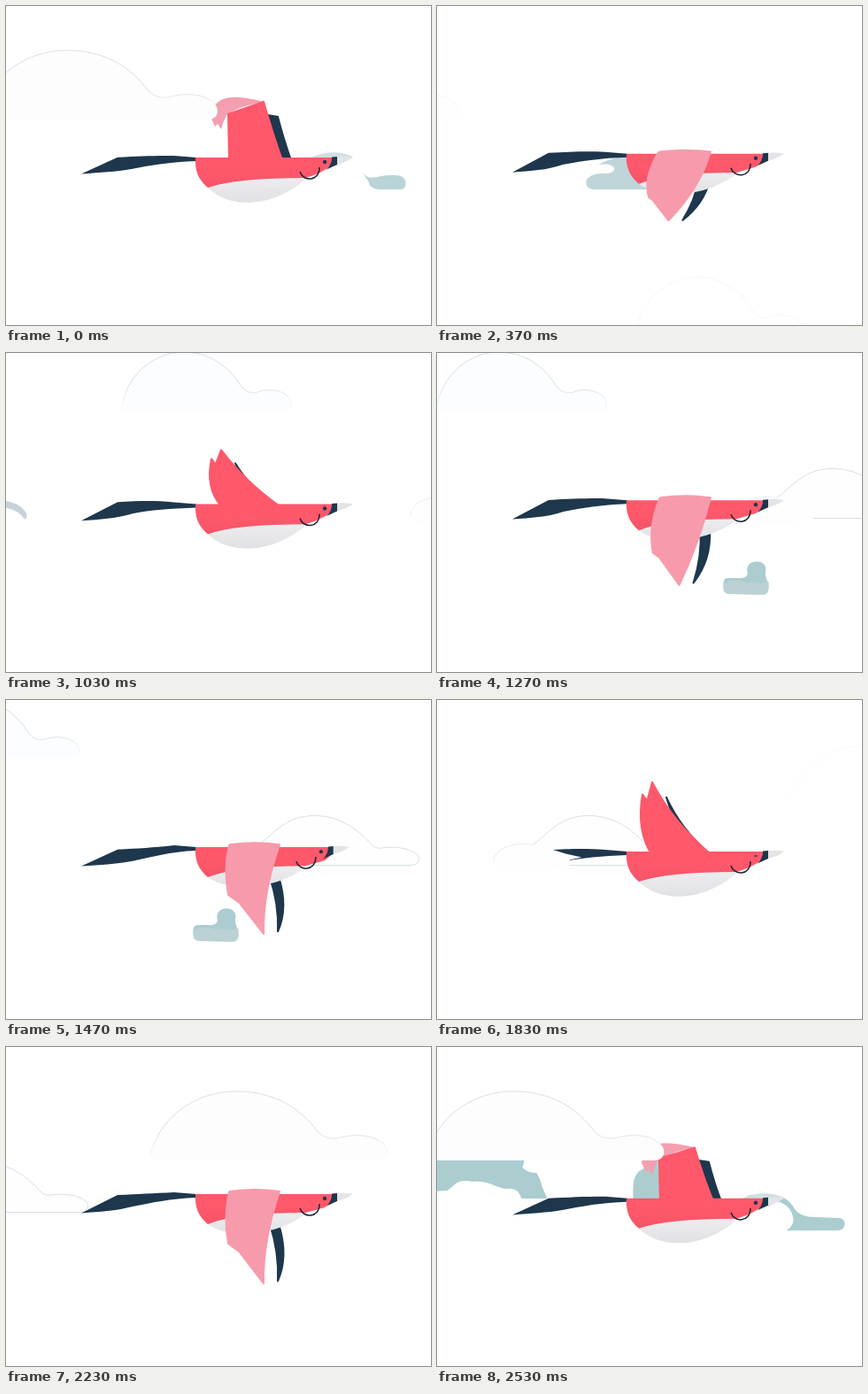
An HTML page with a canvas that plays this animation: 480x360 px, repeating every 2560 ms.

```html
<!DOCTYPE html>
<html>
<head>
<meta charset="utf-8">
<style>
  html, body { margin: 0; width: 100%; height: 100%; overflow: hidden; background: #fff; }
  canvas { display: block; }
</style>
</head>
<body>
<canvas id="stage" width="480" height="360"></canvas>
<script>
const ctx = document.getElementById('stage').getContext('2d');
const LOOP = 2560, FLAP = LOOP / 3;
const RED = '#ff586b', PINK = '#f79bac', NAVY = '#1e374c', TEAL = '#abcdd0';

const bigCloud = new Path2D('M5 78Q-3 75 2 64C15 25 54 0 97 0C140 0 170 20 188 45Q197 55 212 53C240 44 267 55 267 68Q267 78 255 78Z');
const lowCloud = new Path2D('M5 56Q-4 55 0 46C8 32 30 31 42 33C55 27 70 0 105 0C138 0 156 18 169 31Q174 39 186 36C208 34 224 42 224 48Q224 56 214 56Z');
const lowCloudFront = new Path2D('M5 62Q-4 55 0 46C8 32 30 31 42 33L64 38L80 43L98 47L84 50L92 54L60 62Z');
const crest = new Path2D('M-50 20Q-45 0 -26 0Q-6 2 0 15V20Z');
const boot = new Path2D('M4 18H18Q29 18 27 10C25 -4 49 -4 48 9Q46 15 51 24V30H0V24Q0 19 4 18Z');
const bootSole = new Path2D('M0 25Q10 18 22 22Q36 25 51 22V31Q50 37 44 37L6 36Q0 35 0 30Z');
const plume = new Path2D('M350 168Q392 160 404 182Q410 192 428 192L455 193Q462 194 461 201Q460 207 452 207H395Q406 200 402 190Q398 172 365 171Z');
const wisp = new Path2D('M403 188Q409 196 419 193Q452 186 452 200Q452 207 446 207H421Q411 206 410 198Z');
const puff = new Path2D('M215 169L248 178V207H176Q168 205 169 197Q174 188 190 189Q201 189 201 183Q198 177 183 179Q195 172 215 169Z');
const mistLeft = new Path2D('M-5 126H100L97 136Q103 142 113 142Q118 150 119 157L125 171H96Q92 158 80 160C68 160 60 150 40 152C22 148 20 158 12 162L-5 163Z');
const mistRight = new Path2D('M252 126V172H222V160Q222 139 238 136Z');
const beakHaze = new Path2D('M344 171Q369 160 392 170L375 180Z');
const foldedTip = new Path2D('M-60 17Q-59 4 -48 -2Q-35 -9 0 0Q-24 4 -41 14Q-45 20 -48 31L-52 25L-55 28Z');

const clamp = v => Math.max(0, Math.min(1, v));
const mix = (a, b, u) => a + (b - a) * u;
const within = (t, a, b) => t >= a && t < b;
const ease = (a, b, t) => {
  const u = clamp((t - a) / (b - a));
  return u * u * (3 - 2 * u);
};

function fill(path, color, x = 0, y = 0) {
  ctx.save();
  ctx.translate(x, y);
  ctx.fillStyle = color;
  ctx.fill(path);
  ctx.restore();
}

function cloud(shape, x, y, { sx = 1, sy = 1, alpha = 1, color = '#fdfdfd', line = '#c6d2d6', base = line } = {}) {
  const path = new Path2D();
  path.addPath(shape, new DOMMatrix([sx, 0, 0, sy, x, y]));
  ctx.globalAlpha = clamp(alpha);
  fill(path, color);
  ctx.strokeStyle = shade(y + 45 * sy, y + 77 * sy, line, base);
  ctx.lineWidth = .7;
  ctx.stroke(path);
  ctx.globalAlpha = 1;
}

function shade(y0, y1, from, to) {
  const g = ctx.createLinearGradient(0, y0, 0, y1);
  g.addColorStop(0, from);
  g.addColorStop(1, to);
  return g;
}

// Slow downstroke, quick folded recovery; down, reach and fold run 0..1
function strokeAt(p) {
  const down = p < .65 ? ease(.13, .53, p) : 1 - ease(.7, 1, p);
  const reach = p < .2 ? 1 - ease(0, .13, p) : ease(.3, .62, p);
  const fold = p < .5 ? 1 - ease(.01, .13, p) : ease(.87, .98, p);
  const tip = [243 + 48 * reach, mix(92, 267, down) + 16 * fold];
  return { p, down, reach, fold, tip };
}

// Control point beside the middle of an edge
const bend = (a, b, dx, dy = 0) => [(a[0] + b[0]) / 2 + 2 * dx, (a[1] + b[1]) / 2 + 2 * dy];

function drawNearWing({ p, down, reach, fold, tip }) {
  const rootY = 174 - 11 * down;
  const back = [mix(242, 252, Math.max(reach, down)), rootY], front = [309 + 3 * fold, rootY];
  const finger = [tip[0] - 11 - 29 * reach, tip[1] + mix(14, -25 - 20 * reach, down)];
  const notch = bend(finger, tip, -4 * down, 7 * (1 - fold) * (1 - 2 * down));
  const wing = new Path2D();
  wing.moveTo(...back);
  wing.quadraticCurveTo(...bend(back, finger, -6 * (1 - reach) - 3 * down, 3 * (1 - reach)), ...finger);
  wing.lineTo(...notch);
  wing.lineTo(...tip);
  wing.quadraticCurveTo(...bend(tip, front, -5 * (1 - fold) + 20 * down * (1 - reach), 2), ...front);
  wing.quadraticCurveTo(282, rootY - 4 * down, ...back);
  if (fold > .4) fill(foldedTip, '#f49fb0', ...tip);
  const color = within(p, .3, .88) ? PINK : RED;
  fill(wing, color);
  ctx.strokeStyle = color;
  ctx.lineWidth = 2;
  ctx.lineJoin = 'round';
  ctx.stroke(wing);
}

function drawFarWing({ down, fold, tip }) {
  const end = [tip[0] + 16, tip[1] + mix(17, -3, down)];
  const top = [end[0] - 12 * fold, end[1] - 2 * fold];
  const rootY = mix(174, 200, down);
  const back = [mix(280, 298, down), rootY], front = [308 + 14 * fold, rootY];
  const wing = new Path2D();
  wing.moveTo(...back);
  wing.quadraticCurveTo(...bend(back, top, 3 * down), ...top);
  wing.lineTo(...end);
  wing.quadraticCurveTo(...bend(end, front, mix(-4, 6, down) * (1 - fold), 2), ...front);
  fill(wing, NAVY);
  ctx.strokeStyle = NAVY;
  ctx.lineWidth = 2;
  ctx.lineJoin = 'round';
  ctx.stroke(wing);
}

function drawTail({ p, down }) {
  const elbow = 168.3 + 2.5 * Math.cos(2 * Math.PI * (p + .05));
  const root = 171 - 5 * down, tip = 189.5 - 2 * down;
  fill(new Path2D(`M85 ${tip}L126 ${elbow}C150 ${elbow - 1} 165 ${elbow - 2} 190 ${root - 2}L215 ${root}V${root + 4}
    C185 ${root + 5} 164 ${elbow + 9} 143 ${elbow + 13}C122 ${tip - 2} 108 ${tip - 2} 85 ${tip}Z`), NAVY);
}

function drawBody({ p, down }, blink) {
  const top = 171 - 5 * down, seam = 194 - 7 * down, left = 205 - 5 * down, chin = 185 - 4 * down;
  const belly = new Path2D(`M228 ${left}C${250 - 4 * down} ${228 - 14 * down} 300 ${230 - 12 * down} 340 ${seam}L300 ${seam - 5}Z`);
  fill(belly, shade(seam, 224 - 10 * down, '#ededef', '#dfe0e3'));
  const red = new Path2D(`M214 ${top}H368Q369 ${top + 10} 360 ${chin}Q350 ${seam - 3} 338 ${seam}Q260 ${seam} 228 ${left}C217 ${left - 9} 213 ${left - 20} 214 ${top}Z`);
  fill(red, shade(top + 14, left + 6, RED, '#f25368'));

  ctx.save();
  ctx.translate(-5 * clamp(1 - Math.abs(p - .74) / .1), top - 171);
  fill(new Path2D('M368 170.5L374 170V179L362 184.5Q368 179 368 170.5Z'), NAVY);
  fill(new Path2D('M374 170Q384 169 392 171Q384 176.5 374 179Z'), '#e3e4e6');
  ctx.fillStyle = NAVY;
  ctx.beginPath();
  ctx.ellipse(360, 176, 2.2, blink ? .7 : 2.2, 0, 0, 7);
  ctx.fill();
  ctx.strokeStyle = '#1b2530';
  ctx.lineWidth = 1.5;
  ctx.stroke(new Path2D('M332 187C335 198 354 199 354 182'));
  ctx.restore();
}

function drawMist(t) {
  const early = t > LOOP / 2 ? t - LOOP : t;
  if (within(early, -90, -10)) fill(plume, TEAL, -.56 * (early + 30));
  if (within(early, -10, 180)) fill(wisp, '#b9d3d6', -.56 * early);
  if (within(early, 180, 700)) fill(puff, '#bfd5d8', -.56 * (early - 370));
  if (within(early, -70, 40)) fill(beakHaze, '#cfe0e2');
  if (t > 2440) {
    const x = -.57 * (t - 2530);
    fill(mistLeft, TEAL, x);
    fill(mistRight, TEAL, x);
  }
  if (within(t, 1250, 1650)) {
    const x = 212 - .56 * (t - 1470);
    fill(boot, TEAL, x, 236);
    fill(bootSole, '#bcd1d4', x, 236);
  }
}

function draw(t) {
  const stroke = strokeAt(t % FLAP / FLAP);
  ctx.fillStyle = '#fff';
  ctx.fillRect(0, 0, 480, 360);

  // Clouds behind the bird
  const softBase = '#c6d2d600';
  cloud(bigCloud, 131 - .545 * (t - 1030), -1, { sx: .719, sy: .86, color: '#fbfdfe', base: softBase });
  if (t < 900) cloud(bigCloud, 225 - .57 * (t - 370), 306, { sx: .705, sy: .86, alpha: t / 1500 });
  const lowX = 243 - .492 * (t - 1470);
  cloud(lowCloud, lowX, 130.5, { color: '#fefefe' });
  if (within(t, 650, 1100)) {
    const x = 24 - .72 * (t - 1030);
    fill(crest, '#c7d2d8', x, 167);
    fill(crest, '#fff', x - 2, 174);
  }
  drawMist(t);

  drawFarWing(stroke);
  drawTail(stroke);
  fill(lowCloudFront, '#fefefe', lowX, 130.5);
  drawBody(stroke, within(t, 1790, 1880));
  drawNearWing(stroke);

  // Large cloud passes in front
  const x = 164 - .58 * ((t < 800 ? t + LOOP : t) - 2230);
  cloud(bigCloud, x, 50, { alpha: Math.min((430 - x) / 200, (x + 300) / 150), base: softBase });
}

function tick() {
  draw(performance.now() % LOOP);
  requestAnimationFrame(tick);
}
tick();
</script>
</body>
</html>
```
